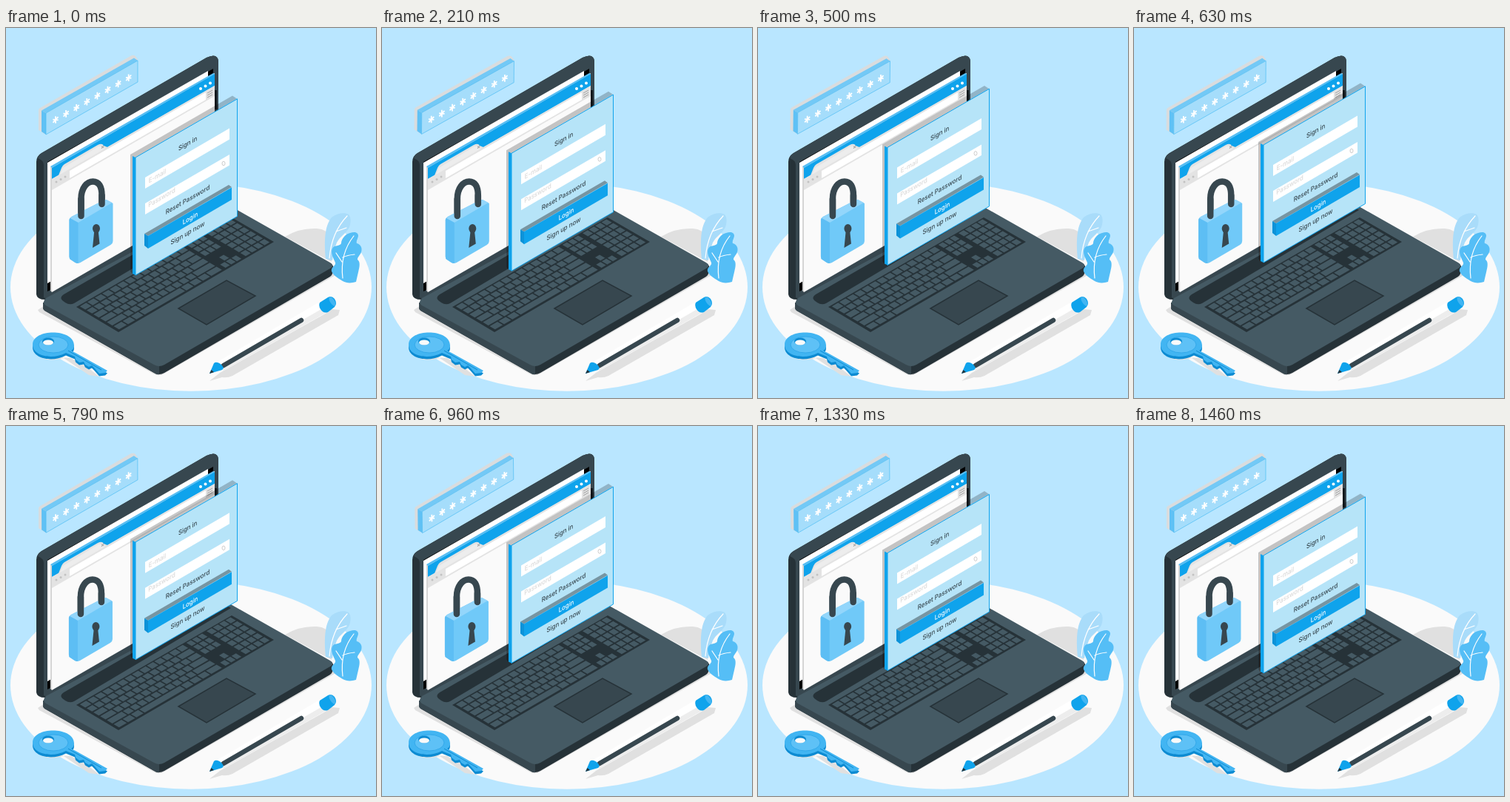
Recreate the animation shown at these times as an HTML page. Size 500 by 500 pixels, loop 1500 ms.

```html
<!DOCTYPE html>
<html lang="en">
<head>
<meta charset="utf-8">
<style>
  html, body { margin: 0; width: 100%; height: 100%; overflow: hidden; background: #b9e6ff; }
  svg { display: block; width: 100vw; height: 100vh; }
  text { font: 500 9px Inter, sans-serif; text-anchor: middle; }
</style>
</head>
<body>
<svg viewBox="0 0 500 500">
  <ellipse cx="250" cy="350.3" rx="244" ry="140.5" fill="#fafafa"/>

  <g id="shadows" fill="#e0e0e0">
    <path d="M377 282Q396 270 420 271Q434 272 438 282L440 316Z"/>
    <path d="M43 381L52 375L207 462L442 326L447 333L212 468Q206 471 199 467L45 384Z"/>
    <path d="M275 477L289 466L440 380L451 381L449 388L306 470Q300 473 292 472Z"/>
    <path d="M46 444Q58 452 78 446L112 469L126 471L112 460L88 446Z"/>
  </g>

  <g id="lid">
    <path d="M41 360V181Q41 173 48 169L271 40Q286 33 287 45V240L56 367Q42 368 41 360Z" fill="#263238"/>
    <path d="M51 364V185Q51 179 43 176Q44 171 48 169L271 40Q286 33 287 45V240L56 367Z" fill="#37474f"/>
    <path d="M56 181L280 55V232L56 356Z" fill="#000"/>
    <path d="M56 182L273 58V220L56 345Z" fill="#fff"/>
    <path d="M282 84H285V110H282Z" fill="#10181c"/>
  </g>

  <g id="browser">
    <path d="M60 187L62 188V357L60 355Z" fill="#d5d5d5"/>
    <path d="M62 188L282 61V230L62 357Z" fill="#fafafa"/>
    <path d="M60 187L280 61L282 62L62 189Z" fill="#56bdf3"/>
    <path d="M62 189L282 62V78L62 204Z" fill="#0fa3ec"/>
    <path d="M71 199L75 189Q76 186 79 184L124 158Q130 155 132 159L137 161L282 78V92L62 219V204Z" fill="#e3e3e3"/>
    <path d="M73 198L77 189L125 160L130 160L134 163Z" fill="#ededed"/>
    <path d="M86 193L270 87V97L86 203Z" fill="#fff"/>
    <path d="M129 160L132 162M132 159L129 163M272 88L279 84M272 91L279 87M272 94L279 90" stroke="#999" stroke-width=".9"/>
    <g fill="#c2c2c2"><circle cx="68" cy="208" r="1.5"/><circle cx="74" cy="204.5" r="1.5"/><circle cx="80" cy="201" r="1.5"/></g>
    <g fill="#fff"><circle cx="263" cy="82" r="2"/><circle cx="269.5" cy="78.5" r="2"/><circle cx="276" cy="74.5" r="2"/></g>
  </g>

  <g id="base">
    <path d="M50 371V378Q50 381 54 383L200 466Q207 470 214 466L438 336Q443 333 442 321Z" fill="#263238"/>
    <path d="M50 371V378Q50 381 54 383L200 466Q204 469 207 468V456Z" fill="#37474f"/>
    <path d="M54 375Q48 371 54 365L295 236L438 317Q445 321 438 325L214 455Q207 459 200 455Z" fill="#455a64"/>
    <path d="M78 360L290 238L304 246L92 372Q86 375 80 371L76 368Q72 364 78 360Z" fill="#263238"/>
    <path d="M95 377L305 256L362 289L152 411Z" fill="#263238"/>
    <path id="keys" fill="#455a64"/>
    <path d="M233 379L298 341L337 362L271 401Z" fill="#37474f" stroke="#263238" stroke-width="1.5"/>
  </g>

  <g id="lock">
    <path d="M101 254V231C101 216 109 207.500 117 207.500C125 207.500 129 214 129 226V240" fill="none" stroke="#37474f" stroke-width="8.5"/>
    <path d="M85 259Q85 257 88 255L131 233Q134 231 137 233L144 237V288Q144 291 141 293L100 317Q96 319 93 317L87 313Q85 312 85 309Z" fill="#70c9f8"/>
    <path d="M86 257L88 255L131 233Q134 231 137 233L143 236L97 263Z" fill="#93d6fb"/>
    <path d="M85 259L86 257L97 263V318Q95 318 93 317L87 313Q85 312 85 309Z" fill="#5dbef4"/>
    <path d="M101 254V231M129 238V226" stroke="#37474f" stroke-width="8.5" stroke-linecap="round"/>
    <ellipse cx="121.5" cy="271" rx="5" ry="6" fill="#37474f"/>
    <path d="M119 272H124L126 291.500L116.500 297Z" fill="#37474f"/>
  </g>

  <g id="bar">
    <path d="M44 111Q44 109 46 108L169 37.500Q172 36 175 38L178 43L54 144L44 138Z" fill="#d9dcde"/>
    <path d="M48 111.500L173 40.500L178 44L54 115Z" fill="#73c9f6"/>
    <path d="M48 111.500L54 115V144L48 140Z" fill="#5fc1f5"/>
    <path d="M54 115L178 44V73L54 144Z" fill="#a5ddfb" stroke="#4dbdf4" stroke-width=".7"/>
    <path id="stars" fill="none" stroke="#fff" stroke-width="1.8"/>
  </g>

  <g id="panel">
    <path d="M168 171L306 91.500L312 95.500L175 175L171 332L168 329Z" opacity=".22"/>
    <path d="M171 173L175 175V334L171 332Z" fill="#0fa3ec"/>
    <path d="M175 175L312.500 95.800V254.500L175 334Z" fill="#b6e4f8" stroke="#0fa3ec"/>
    <path d="M188 202L302 135.500V150.500L188 217ZM188 237L302 171V185.500L188 252Z" fill="#fff"/>
    <path d="M187 278L301 212L305 215L192 281Z" opacity=".35"/>
    <path d="M187 278L192 281V298L187 294Z" fill="#0d92d8"/>
    <path d="M192 281L305 215.500V232L192 298Z" fill="#0fa3ec"/>
    <ellipse cx="294" cy="183" rx="2" ry="2.8" fill="none" stroke="#c8c8c8" stroke-width=".9"/>
    <g id="labels"></g>
  </g>

  <g id="key">
    <use href="#keyTop" y="3.5" fill="#0d8bd2"/>
    <g fill="#42b5f2">
      <path id="keyTop" d="M36 428C36 406 92 406 92 429Q92 434 88 436L94 439L137 463L134 466L126 467L119 459L116 456L112 458L107 455L105 451L99 452L94 448L93 444L81 439C62 449 36 443 36 428Z"/>
    </g>
    <ellipse cx="64" cy="428" rx="20" ry="11" fill="#5ec1f6" stroke="#2ba4e8" stroke-width=".8"/>
    <ellipse cx="57" cy="423.5" rx="8" ry="5" fill="#0d8bd2"/>
    <ellipse cx="57" cy="425" rx="7" ry="3.5" fill="#fafafa"/>
    <path d="M84 436L129 462" stroke="#0d8bd2"/>
  </g>

  <g id="pen">
    <path d="M286 451L424 370L435 384L294 463Z" fill="#fff"/>
    <path d="M290 458L426 380L434 384L294 463Z" fill="#ededed"/>
    <path d="M294 456L399 395" stroke="#37474f" stroke-width="6.5" stroke-linecap="round"/>
    <path d="M275 467L281 453Q284 450 290 454Q296 459 292 462Z" fill="#0fa3ec"/>
    <path d="M275 467L277.500 462L281 465Z" fill="#263238"/>
    <path d="M424 371L435 364Q440 361 444 366Q448 372 444 377L435 384Q429 386 425 380Q422 375 424 371Z" fill="#0fa3ec"/>
    <ellipse cx="441" cy="369.5" rx="3" ry="7" transform="rotate(-32 441 369.5)" fill="#42b5f2"/>
  </g>

  <g id="leaves" fill="none" stroke="#fff" stroke-width="1.2" stroke-linecap="round">
    <path d="M432 312C430 290 430 268 440 256C447 250 458 249 463 252C467 256 466 266 463 271C458 279 452 281 447 290Q443 300 441 314Z" fill="#a9dcfa" stroke="none"/>
    <path d="M437 311Q440 276 461 254M446 275L460 270"/>
    <path d="M473 343C467 345 460 345 455 342C448 338 438 331 440 326C441 322 446 321 445 317C443 312 438 304 441 298C443 293 452 295 453 291C453 285 459 278 465 277C471 275 476 276 476 281C475 286 473 288 474 291C479 292 482 297 480 303C478 308 475 309 475 313C479 316 478 322 476 330Z" fill="#55bef6" stroke="none"/>
    <path d="M455 338Q451 305 470 281M454 316L446 304M455 310Q461 307 471 306"/>
  </g>
</svg>
<script>
const DURATION = 1500, FRAMES = 36;
const $ = id => document.getElementById(id);
const iso = (x, y) => `matrix(.866 -.5 0 1 ${x} ${y})`;

// Keyboard space: u runs along the rows, v from the back row to the front
const keyPoint = (u, v) => `${95 + 210 * u + 57 * v} ${377 - 121.5 * u + 33.5 * v}`;
const key = (u, v, w, h) =>
  `M${keyPoint(u, v)}L${keyPoint(u + w, v)}L${keyPoint(u + w, v + h)}L${keyPoint(u, v + h)}Z`;

function keyRow(from, to, weights, v, h) {
  const unit = (to - from) / weights.reduce((a, b) => a + b);
  let u = from;
  return weights.map(w => {
    const path = key(u, v, w * unit - .008, h);
    u += w * unit;
    return path;
  }).join('');
}

const ones = n => Array(n).fill(1);
const mainRows = [
  ones(14), [...ones(13), 2], [1.5, ...ones(12), 1.5],
  [1.8, ...ones(11), 2.2], [2.3, ...ones(10), 2.7], [1.3, 1.2, 1.2, 6, 1.2, 1.2, 1.2, 1.7]
];
$('keys').setAttribute('d', mainRows.map((row, i) => {
  const v = .03 + i * .16, h = .128;
  const nav = i === 3 ? '' : i === 4 ? key(.737, v, .029, h) : keyRow(.7, .81, ones(3), v, h);
  return keyRow(.015, .685, row, v, h) + nav + keyRow(.83, .992, ones(4), v, h);
}).join(''));

$('stars').setAttribute('d', Array.from({ length: 8 }, (_, i) => {
  const x = 67 + 14.1 * i, y = 124 - 8.1 * i;
  return `M${x} ${y - 4.8}v9.6M${x - 3.7} ${y - .3}l7.4 .6M${x - 3.5} ${y + 3.8}l7 -7.6`;
}).join(''));

const labels = [
  ['Sign in', 245.5, 156, '#37474f'], ['E-mail', 204.5, 200, '#d9d9d9'],
  ['Password', 210.5, 229, '#d9d9d9'], ['Reset Password', 245.5, 232, '#37474f'],
  ['Login', 249, 257, '#fff'], ['Sign up now', 245.5, 277, '#37474f']
];
for (const [words, x, y, color] of labels) {
  const text = document.createElementNS('http://www.w3.org/2000/svg', 'text');
  text.textContent = words;
  text.setAttribute('transform', iso(x, y + 3));
  text.style.fill = color;
  $('labels').append(text);
}

const shakeStops = [0, -1, 2, -4, 4, -4, 4, -4, 2, -1, 0, 0];
function shake(p) {
  const i = Math.floor(p * 10), f = p * 10 - i;
  return shakeStops[i] * (1 - f) + shakeStops[i + 1] * f;
}
const sway = p => p < .25 ? 4 * p : p < .75 ? 2 - 4 * p : 4 * p - 4;
const rise = p => -39.7 * Math.min(p, 1 - p);

function draw(now) {
  const step = Math.floor(((now + 4) % DURATION) * FRAMES / DURATION);
  const p = step / (FRAMES - 1);
  $('panel').setAttribute('transform', `translate(0 ${rise(p)})`);
  $('lock').setAttribute('transform', `translate(${shake(p) + .5} 0)`);
  $('bar').setAttribute('transform', `rotate(${sway(p)} 111 91)`);
}

let start;
function tick(now) {
  start ??= now;
  draw(now - start);
  requestAnimationFrame(tick);
}
draw(0);
requestAnimationFrame(tick);
</script>
</body>
</html>
```
